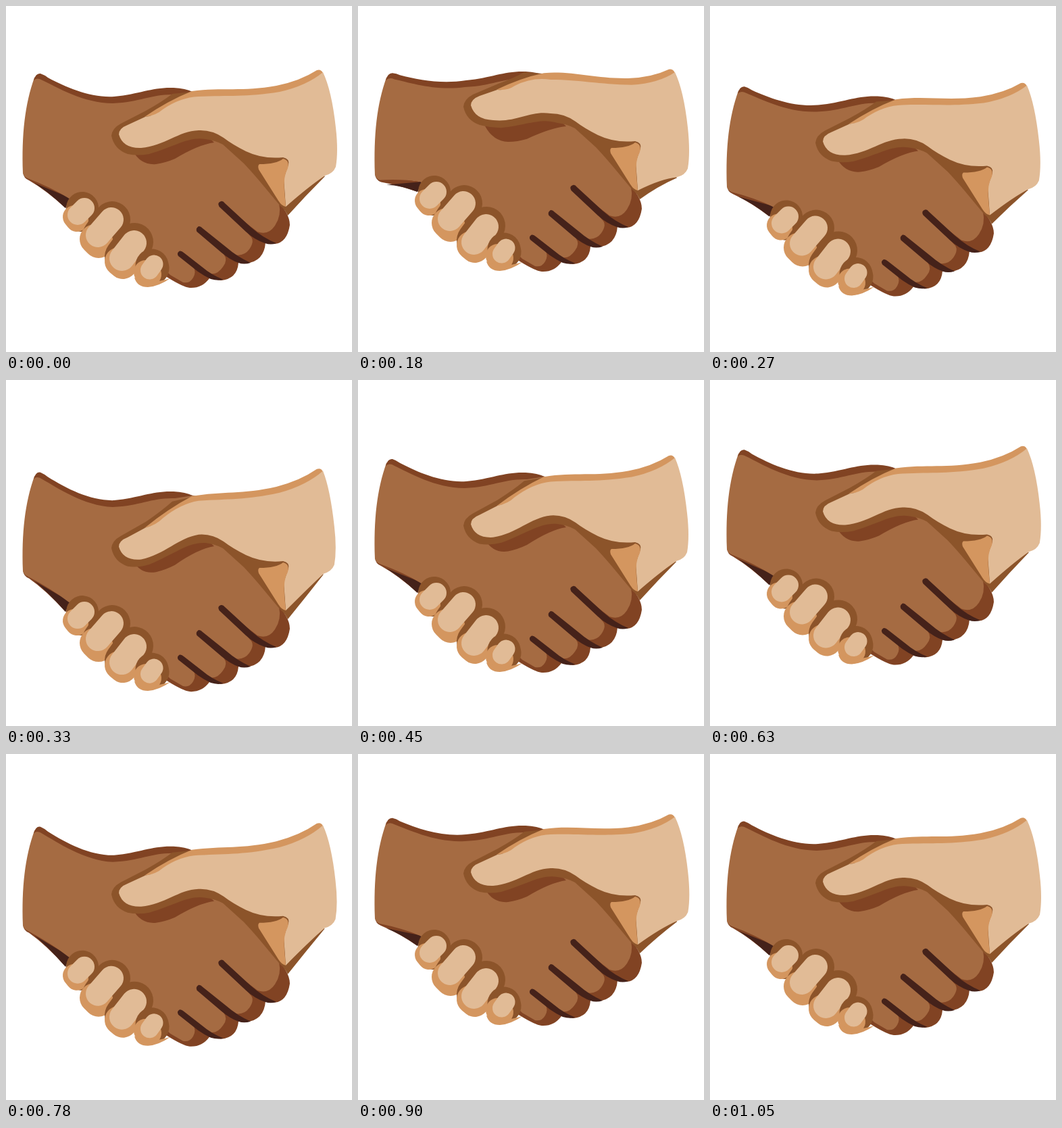
An HTML page with a canvas for the animation above (1080 ms loop, 512 by 512 pixels).

```html
<!DOCTYPE html>
<html>
<head>
<meta charset="utf-8">
<title>Handshake</title>
<style>
html, body { margin: 0; height: 100%; overflow: hidden; background: #fff; }
canvas { display: block; width: 100vmin; height: 100vmin; }
</style>
</head>
<body>
<canvas width="512" height="512"></canvas>
<script>
const ctx = document.querySelector('canvas').getContext('2d');
const SKIN = '#a56b42', EDGE = '#8c542a', SHADE = '#814323', DARK = '#45221a';
const LIGHT = '#e1bb96', TAN = '#d4965f';

// Vertical offsets at every half swing of 180 ms
const HALF = 180, STEP = 30, LOOP = 1080;
const handKeys = [0, -24, 49, -17, 26, -15, 0];
const cuffKeys = [0, 0, 39, -5, 11.5, -5, 0];
const thumbKeys = [0, -19, 15, 0, 0, 0, 0];

const clamp = (v, lo = 0, hi = 1) => Math.min(hi, Math.max(lo, v));

function ease(keys, t) {
  const i = Math.floor(t / HALF);
  const k = (1 - Math.cos(Math.PI * (t / HALF - i))) / 2;
  return keys[i] + (keys[i + 1] - keys[i]) * k;
}

// A part is {color, d, width (0 = fill), thumb (share of the thumb's swing)}
const fill = (color, d, thumb = 0) => ({ color, d, width: 0, thumb });
const line = (color, width, d) => ({ color, d, width, thumb: 0 });

// Rounded finger: outline, tip and lit side as thick strokes
const finger = (edge, edgeW, tip, tipW, top, topW) => [
  line(EDGE, edgeW, edge), line(TAN, tipW, tip), line(LIGHT, topW, top)
];

const parts = [
  // underside of the left arm
  fill(SHADE, 'M25,246 Q26,255 34,258 Q60,273 88,299 L95,284 L40,250Z'),
  fill(DARK, 'M42,262 Q64,276 88,299 L95,284Z'),
  // shaded fingertips of the left hand
  fill(SHADE, `M396,282 Q420,306 420,324 Q416,350 398,352 L384,350 Q382,378 355,381 L344,380
    Q342,404 318,406 L301,403 Q290,418 272,417 Q262,416 238,401 L228,392 L260,360 L330,290Z`),
  // left arm and hand
  fill(SKIN, `M42,106 C28,145 23,190 25,247 Q26,252 32,255 Q68,269 92,284 L160,330 L225,380
    L243,398 L262,409 Q272,411 277,402 Q282,393 277,386 L257,366 L302,396 Q313,398 321,386
    Q329,376 322,367 L286,330 L338,368 Q352,371 360,360 Q369,347 361,340 L319,293 L372,334
    Q388,340 398,325 Q408,310 404,292 L392,262 L318,195 L300,130 L270,126
    C240,120 215,132 180,138 C130,144 90,124 49,102Z`),
  // gaps between the fingers
  fill(DARK, `M315.5,297 Q312,291 318,289 Q321,288 324,292 L362,327 Q380,343 400,351
    Q392,354 383,351 Q368,346 355,334Z`),
  fill(DARK, `M282.5,334 Q280,329 285,326 Q288,325.5 291,329 L326,357 Q342,371 362,380
    Q352,383 344,380 Q332,376 319,365Z`),
  fill(DARK, `M255,370 Q252,365 257,362.5 Q260,362 263,365 L290,386 Q304,398 322,405
    Q312,407 303,404 Q294,400 284,393Z`),
  fill(SHADE, `M41,110 Q44,99 51,100 Q57,102 62,106 C90,121 125,136 160,134
    C200,130 215,120 248,121 Q266,122 276,127 L250,131 C215,130 200,142 158,144
    C115,144 75,120 54,110 Q46,105 41,110Z`),
  // thumb shadow
  fill(SHADE, 'M188,215 Q200,236 222,234 Q236,232 250,226 Q285,205 308,202 L290,185Z', .7),
  // right hand
  fill(EDGE, `M276,127 L246,130 Q232,141 207,155 L170,174 Q157,181 156,192 Q160,212 180,219
    Q195,222 212,219 C250,208 270,193 295,197 Q310,199 321,205 L352,233 Q366,248 376,260
    L406,296 Q412,300 417,310 Q443,281 472,252 L425,215 L380,200 L290,140Z`, 1),
  fill(TAN, `M205,164 Q240,140 275,126 C320,120 350,127 400,118 Q435,111 460,95
    Q466,93 469,99 L440,130 L290,150Z`, 1),
  fill(LIGHT, `M167,190 Q167,181 180,176 L206,164 Q222,162 232,153 Q258,135 285,134
    C330,132 355,135 405,127 Q445,118 469,98 Q482,125 488,180 Q492,215 488,238
    Q484,248 472,251 Q448,267 414,297 L411,255 L418,235 Q420,226 410,224
    Q380,227 355,215 Q335,205 322,195 Q305,183 285,184 C255,185 235,207 200,210
    Q173,211 167,190Z`, 1),
  fill(TAN, `M375,234 Q400,234 410,226 Q420,228 417,240 Q410,252 412,275 L414,297
    Q408,296 403,288 L374,242 Q372,236 375,234Z`),
  // fingers of the right hand
  ...finger('M113,299 L112,310', 48, 'M101,312 L105,317', 34, 'M116,299 L106,309', 30),
  ...finger('M157,316 L140,340', 54, 'M131,345 L137,351', 44, 'M156,316 L136,339', 36),
  ...finger('M190,349 L174,371', 56, 'M167,378 L173,383', 42, 'M189.5,350.5 L171.5,373.5', 37),
  ...finger('M216,384 L217,388', 49, 'M207,394 L212,397', 36, 'M219,382 L212.5,391', 27),
  fill(TAN, 'M190,402 Q194,416 210,416 Q226,415 243,403 Q228,408 212,408Z')
];

// Cuffs follow the arm, the middle follows the hands, with a blend between
function warp(x, y, pose, thumb) {
  const { hand, cuff, swing } = pose;
  const low = y > 200;
  const bend = 320 + 105 * clamp((y - 130) / 90);
  const w = clamp(Math.min((x - 48) / (low ? 36 : 90), (468 - x) / (468 - bend)), low ? -.1 : 0);
  const dx = x > 470 ? -.06 * cuff : 0;
  const dy = cuff + (hand - cuff) * w + thumb * swing * clamp((290 - x) / 100);
  return `${x + dx},${y + dy}`;
}

function draw() {
  const t = Math.floor(performance.now() / STEP) * STEP % LOOP;
  const pose = { hand: ease(handKeys, t), cuff: ease(cuffKeys, t), swing: ease(thumbKeys, t) };
  ctx.fillStyle = '#fff';
  ctx.fillRect(0, 0, 512, 512);
  ctx.lineCap = ctx.lineJoin = 'round';
  for (const { color, d, width, thumb } of parts) {
    const path = new Path2D(d.replace(/([\d.]+),([\d.]+)/g, (_, x, y) => warp(+x, +y, pose, thumb)));
    ctx.fillStyle = ctx.strokeStyle = color;
    ctx.lineWidth = width;
    if (width) ctx.stroke(path);
    else ctx.fill(path);
  }
  requestAnimationFrame(draw);
}
draw();
</script>
</body>
</html>
```
